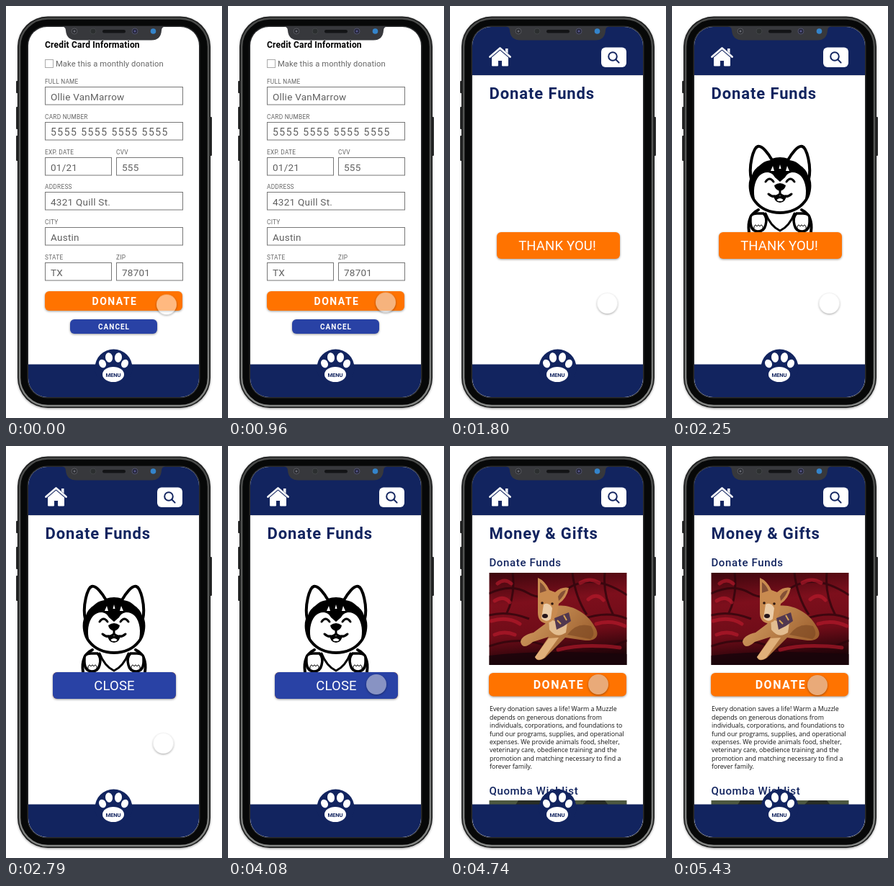
Write an HTML page that moves like this. It is 300 px wide and 572 px high and loops after 5.46 s.

```html
<!DOCTYPE html>
<html lang="en">
<head>
<meta charset="utf-8">
<title>Donation flow</title>
<style>
  html, body { margin: 0; width: 100%; height: 100%; overflow: hidden; background: #fff; }
  svg { position: absolute; left: 0; top: 0; display: block; }
  text { font-family: Roboto, sans-serif; }
  .navy { fill: #12245f; }
  .title { font-weight: 700; font-size: 22px; letter-spacing: .88px; }
  .subtitle { font-weight: 500; font-size: 15px; letter-spacing: .65px; }
  .label { font-size: 8.3px; letter-spacing: .25px; fill: #666; }
  .value { font-size: 13.5px; letter-spacing: .25px; fill: #606060; }
  .card { font-size: 14px; letter-spacing: 1.45px; }
  .box { fill: #fff; stroke: #777; }
  .copy { font-family: "Open Sans", sans-serif; font-size: 8.86px; fill: #111; }
  .button { filter: drop-shadow(0 1px 1.5px rgba(0, 0, 0, .4)); }
  .bar { filter: drop-shadow(0 .5px .8px rgba(0, 0, 0, .35)); }
  .orange { fill: #ff7300; }
  .blue { fill: #2942a5; }
  .caption { fill: #fff; text-anchor: middle; }
  .strong { font-weight: 700; letter-spacing: 1.5px; }
  .big { font-size: 18.5px; letter-spacing: .15px; }
  .ink { fill: none; stroke: #000; stroke-width: 4; stroke-linecap: round; stroke-linejoin: round; }
  .fine { stroke-width: 3; }
  #cursor {
    position: absolute; left: -14px; top: -14px; width: 28px; height: 28px; border-radius: 50%;
    box-shadow: 0 1px 3px rgba(0, 0, 0, .38);
  }
</style>
</head>
<body>
<svg width="300" height="572" viewBox="0 0 300 572">
  <defs>
    <linearGradient id="metal" x2="0" y2="1">
      <stop offset="0" stop-color="#4a4b4a"/><stop offset=".5" stop-color="#5b5d5b"/>
      <stop offset="1" stop-color="#858785"/>
    </linearGradient>
    <linearGradient id="sofa" x2=".15" y2="1">
      <stop offset="0" stop-color="#3c060d"/><stop offset=".35" stop-color="#7d0f1c"/>
      <stop offset=".7" stop-color="#700c18"/><stop offset="1" stop-color="#1d0308"/>
    </linearGradient>
    <linearGradient id="coat" x2="1" y2=".6">
      <stop offset="0" stop-color="#d9a468"/><stop offset="1" stop-color="#9a5c2b"/>
    </linearGradient>
    <clipPath id="screen"><rect x="31" y="29" width="237" height="514" rx="26"/></clipPath>
    <clipPath id="photo"><rect x="54.5" y="176" width="191" height="128"/></clipPath>
    <g id="header">
      <path class="navy bar" d="M31 29H268V96H31Z"/>
      <path d="M58.500 70L69.500 60.500 80.500 70V83H72.500V75.500H66.500V83H58.500Z" fill="#fff" stroke="#fff" stroke-linejoin="round"/>
      <path d="M77 59h3.500v7h-3.500Z" fill="#fff"/>
      <path d="M55.500 71L69.500 59 83.500 71" fill="none" stroke="#12245f" stroke-width="4"/>
      <path d="M55.500 70.500L69.500 58.500 83.500 70.500" fill="none" stroke="#fff" stroke-width="2.800" stroke-linecap="round" stroke-linejoin="round"/>
      <rect x="210" y="57.500" width="35" height="27.500" rx="6" fill="#fff"/>
      <g fill="none" stroke="#12245f" stroke-width="2" stroke-linecap="round">
        <circle cx="226" cy="70" r="5.800"/><path d="M230.300 74.300l4.300 4.300"/>
      </g>
    </g>
  </defs>

  <!-- phone body -->
  <g fill="#2b2c2c">
    <rect x="14" y="104" width="4" height="17" rx="1"/><rect x="14" y="140" width="4" height="31" rx="1"/>
    <rect x="14" y="180" width="4" height="35" rx="1"/><rect x="282" y="154" width="4" height="54" rx="1"/>
  </g>
  <rect class="button" x="16" y="14.500" width="268" height="543.500" rx="42" fill="#1c1d1d"/>
  <rect x="19" y="17.500" width="262" height="537.500" rx="39" fill="#070808" stroke="url(#metal)" stroke-width="2.500"/>
  <rect x="29.500" y="27.500" width="240" height="517" rx="27.500" fill="#2a2b2d"/>

  <g clip-path="url(#screen)">
    <g id="form">
      <path d="M31 29H268V543H31Z" fill="#fff"/>
      <text x="54" y="58" font-size="12" font-weight="700" letter-spacing=".2">Credit Card Information</text>
      <rect x="54.500" y="74.500" width="11" height="11" fill="#fff" stroke="#aaa"/>
      <text x="69" y="83.500" font-size="11.200" letter-spacing=".1" fill="#666">Make this a monthly donation</text>
      <g id="fields"></g>
      <rect class="button orange" x="54" y="396" width="191" height="27" rx="6"/>
      <text class="caption strong" x="151" y="414.500" font-size="14">DONATE</text>
      <rect class="button blue" x="89" y="435" width="121" height="20" rx="6"/>
      <text class="caption" x="150" y="448.500" font-size="10" font-weight="700" letter-spacing="1">CANCEL</text>
    </g>

    <g id="thanks">
      <path d="M31 29H268V543H31Z" fill="#fff"/>
      <use href="#header"/>
      <text class="navy title" x="54.600" y="129">Donate Funds</text>
      <g id="husky">
        <path class="ink" d="M120 283C108 289 105 300 107 314M180 283C192 289 195 300 193 314"/>
        <path d="M110 240C106 222 113 197 119 195C125 193 134 205 139 214Q150 210 161 214C166 205 175 193 181 195C187 197 194 222 190 240C193 250 191 264 184 272C176 282 163 287 150 287C137 287 124 282 116 272C109 264 107 250 110 240Z" fill="#fff" stroke="#000" stroke-width="4" stroke-linejoin="round"/>
        <path d="M110 240C111 232 115 226 121 222C127 216 133 214 139 214Q150 210 161 214C167 214 173 216 179 222C185 226 189 232 190 240C192 250 190 264 184 272C188 258 186 244 179 236C171 228 161 230 157 238L150 244L143 238C139 230 129 228 121 236C114 244 112 258 116 272C110 264 108 250 110 240Z"/>
        <path d="M137 229l3-7 2 7zM163 229l-3-7-2 7zM148.500 226l1.500-6 1.500 6z" fill="#fff"/>
        <path class="ink fine" d="M130 244Q135.500 236 141 244M159 244Q164.500 236 170 244"/>
        <path d="M142 249Q150 243 158 249Q157 255 150 257Q143 255 142 249Z"/>
        <path d="M141 262Q150 266 159 262Q158 273 150 273Q142 273 141 262Z"/>
        <path class="ink fine" d="M150 256V262M134 261Q142 268 150 261Q158 268 166 261"/>
        <path d="M145.500 269Q150 265 154.500 269Q154 271 150 271Q146 271 145.500 269Z" fill="#fff"/>
        <path class="ink fine" d="M130 288Q137 306 150 312Q163 306 170 288"/>
        <g id="paw">
          <path d="M109 296Q108 288 118 288H127Q133 294 130 304Q128 313 119 313Q108 312 109 296Z" fill="#fff" stroke="#000" stroke-width="3.500"/>
          <path d="M114 309v-3q2-4 4 0q2-4 4 0q2-4 4 0v3" fill="none" stroke="#000"/>
        </g>
        <use href="#paw" transform="matrix(-1 0 0 1 300 0)"/>
      </g>
      <rect class="button orange" x="65" y="314" width="171" height="37" rx="6"/>
      <text class="caption big" x="149" y="339">THANK YOU!</text>
      <g id="close">
        <rect class="blue" x="65" y="314" width="171" height="37" rx="6"/>
        <text class="caption big" x="150.500" y="339">CLOSE</text>
      </g>
    </g>

    <g id="gifts">
      <path d="M31 29H268V543H31Z" fill="#fff"/>
      <use href="#header"/>
      <text class="navy title" x="54.600" y="129">Money &amp; Gifts</text>
      <text class="navy subtitle" x="54.400" y="167">Donate Funds</text>
      <g clip-path="url(#photo)">
        <path d="M54 176H246V304H54Z" fill="url(#sofa)"/>
        <g fill="none" stroke="#2b050b" stroke-width="3" opacity=".75">
          <path d="M54 205Q85 190 108 204T165 197T246 207M87 176Q91 208 78 234M170 176Q174 210 190 234M215 176Q212 207 227 235M54 235Q80 228 110 240M185 240Q220 228 246 240M54 278Q100 262 140 280T246 270"/>
        </g>
        <g fill="none" stroke="#c01c2e" stroke-width="5" stroke-linecap="round" opacity=".6">
          <path d="M62 215Q75 207 83 217M192 213Q204 203 213 214M181 190Q194 182 207 190M57 243Q80 236 97 247M203 247Q224 241 243 250M66 191Q76 183 85 191M62 262Q76 256 90 262M150 283Q185 274 236 280"/>
        </g>
        <path d="M54 291Q130 282 246 289V304H54Z" fill="#18040a" opacity=".8"/>
        <path d="M148 222C168 219 191 232 201 251C209 263 203 271 188 270L160 266L132 294Q121 301 118 293L137 265L115 272Q101 284 98 272Q99 263 116 259L132 247Z" fill="url(#coat)"/>
        <path d="M163 262Q176 244 196 250Q203 262 195 268Z" fill="#7a4622" opacity=".6"/>
        <path d="M137 238Q150 249 164 238L161 259Q148 268 138 255Z" fill="#e3bd90"/>
        <path d="M118 293L137 267L151 266L131 294Q122 300 118 293Z" fill="#e0b07a"/>
        <path d="M122 208L122 183Q132 187 138 200L146 203Q155 195 165 197Q162 212 151 219L149 231Q144 246 132 246Q122 244 122 231Z" fill="#c98b50"/>
        <path d="M125 204L125 189Q131 193 134 201ZM150 209Q154 201 161 200Q158 209 151 215Z" fill="#855036"/>
        <path d="M130 220Q137 216 142 225L140 240Q134 246 127 239Z" fill="#ebcca8"/>
        <circle cx="128" cy="218" r="1.800" fill="#2d1710"/><circle cx="142" cy="219" r="1.800" fill="#2d1710"/>
        <ellipse cx="132" cy="236" rx="4" ry="3" fill="#26151a"/>
        <path d="M145 239L165 231L168 243L158 250L148 255Z" fill="#51374f"/>
        <path d="M149 242l5 5m4-12l4 7" stroke="#d6a353" stroke-width="2"/>
      </g>
      <rect class="button orange" x="54" y="315" width="191" height="32.500" rx="6"/>
      <text class="caption strong" x="151" y="337" font-size="16">DONATE</text>
      <g id="copy"></g>
      <text class="navy subtitle" x="54.400" y="484">Quomba Wishlist</text>
      <path d="M54.500 492H245.500V500H54.500Z" fill="#4d5840"/>
      <path d="M95 492h40l10 8H90ZM190 492h25l6 8h-39Z" fill="#282d25"/>
    </g>

    <g id="menu">
      <path class="navy" d="M31 497.500H268V543H31Z"/>
      <circle class="navy" cx="149.500" cy="502.500" r="26"/>
      <g fill="#fff">
        <ellipse cx="149" cy="511.500" rx="15" ry="10.500"/>
        <ellipse cx="134" cy="496.500" rx="4.800" ry="6" transform="rotate(-25 134 496.500)"/>
        <ellipse cx="143" cy="488" rx="5" ry="6.800" transform="rotate(-8 143 488)"/>
        <ellipse cx="156" cy="488" rx="5" ry="6.800" transform="rotate(8 156 488)"/>
        <ellipse cx="165" cy="496.500" rx="4.800" ry="6" transform="rotate(25 165 496.500)"/>
      </g>
      <text class="navy" x="149" y="514.500" font-size="7.500" font-weight="700" text-anchor="middle">MENU</text>
    </g>
  </g>

  <!-- notch -->
  <path d="M77 28Q83 29 83 34Q84 47.500 98 47.500H202Q215 47.500 216 34Q216 29 222 28Z" fill="#37383c"/>
  <rect x="134" y="33" width="32" height="4.500" rx="2.200" fill="#131416"/>
  <circle cx="95" cy="35" r="4" fill="#2b2c31" stroke="#56575d"/><circle cx="95" cy="35" r="1.500" fill="#686a72"/>
  <circle cx="121" cy="35" r="4" fill="#2c2f30" stroke="#414446"/>
  <circle cx="179" cy="35" r="4" fill="#25263b" stroke="#50516a"/><circle cx="179" cy="35" r="1.500" fill="#55558a"/>
  <circle cx="204.500" cy="35" r="3.800" fill="#3484cb"/>
</svg>
<div id="cursor"></div>

<script>
const LOOP = 5460;
const $ = id => document.getElementById(id);

// label, row, column, value
const fields = [
  ['FULL NAME', 0, 'full', 'Ollie VanMarrow'],
  ['CARD NUMBER', 1, 'full', '5555 5555 5555 5555'],
  ['EXP. DATE', 2, 'left', '01/21'],
  ['CVV', 2, 'right', '555'],
  ['ADDRESS', 3, 'full', '4321 Quill St.'],
  ['CITY', 4, 'full', 'Austin'],
  ['STATE', 5, 'left', 'TX'],
  ['ZIP', 5, 'right', '78701']
];
$('fields').innerHTML = fields.map(([label, row, column, value]) => {
  const x = column === 'right' ? 153.5 : 54.5;
  const y = 112.5 + Math.round(row * 48.8);
  const width = column === 'full' ? 191 : 92;
  const style = label === 'CARD NUMBER' ? 'value card' : 'value';
  return `<text class="label" x="${x - .5}" y="${y - 4.5}">${label}</text>
    <rect class="box" x="${x}" y="${y}" width="${width}" height="24.5"/>
    <text class="${style}" x="${x + 7.5}" y="${y + 18}">${value}</text>`;
}).join('');

const copy = [
  'Every donation saves a life! Warm a Muzzle',
  'depends on generous donations from',
  'individuals, corporations, and foundations to',
  'fund our programs, supplies, and operational',
  'expenses. We provide animals food, shelter,',
  'veterinary care, obedience training and the',
  'promotion and matching necessary to find a',
  'forever family.'
];
$('copy').innerHTML = copy.map((line, i) =>
  `<text class="copy" x="55" y="${368.4 + i * 11.4}">${line}</text>`).join('');

// steps: [ms, value, easing towards the next step]
function play(id, property, steps) {
  const frames = steps.map(([ms, value, easing = 'linear']) =>
    ({ offset: ms / LOOP, [property]: value, easing }));
  $(id).animate(frames, { duration: LOOP, iterations: Infinity });
}

const dissolve = (id, start) => play(id, 'opacity',
  [[0, 0], [start, 0, 'ease-out'], [start + 300, 1], [LOOP, 1]]);

dissolve('thanks', 1050);
dissolve('husky', 1830);
dissolve('close', 2400);
dissolve('gifts', 4160);

const at = (x, y) => `translate(${x}px, ${y}px)`;
play('cursor', 'transform', [
  [0, at(223, 414.5)], [30, at(223, 414.5), 'ease-in-out'],
  [360, at(219, 411.5)], [1200, at(219, 411.5), 'ease-in-out'],
  [1410, at(218.5, 413)], [3330, at(218.5, 413), 'ease-in-out'],
  [3870, at(206, 331)], [5040, at(206, 331), 'ease-in-out'],
  [5280, at(202, 332)], [LOOP, at(202, 332)]
]);

const idle = 'rgba(255, 255, 255, .5)';
const pressed = 'rgba(215, 215, 220, .55)';
play('cursor', 'backgroundColor', [
  [0, idle], [900, idle], [1050, pressed], [1230, pressed], [1410, idle],
  [3900, idle], [4050, pressed], [LOOP, pressed]
]);
</script>
</body>
</html>
```
